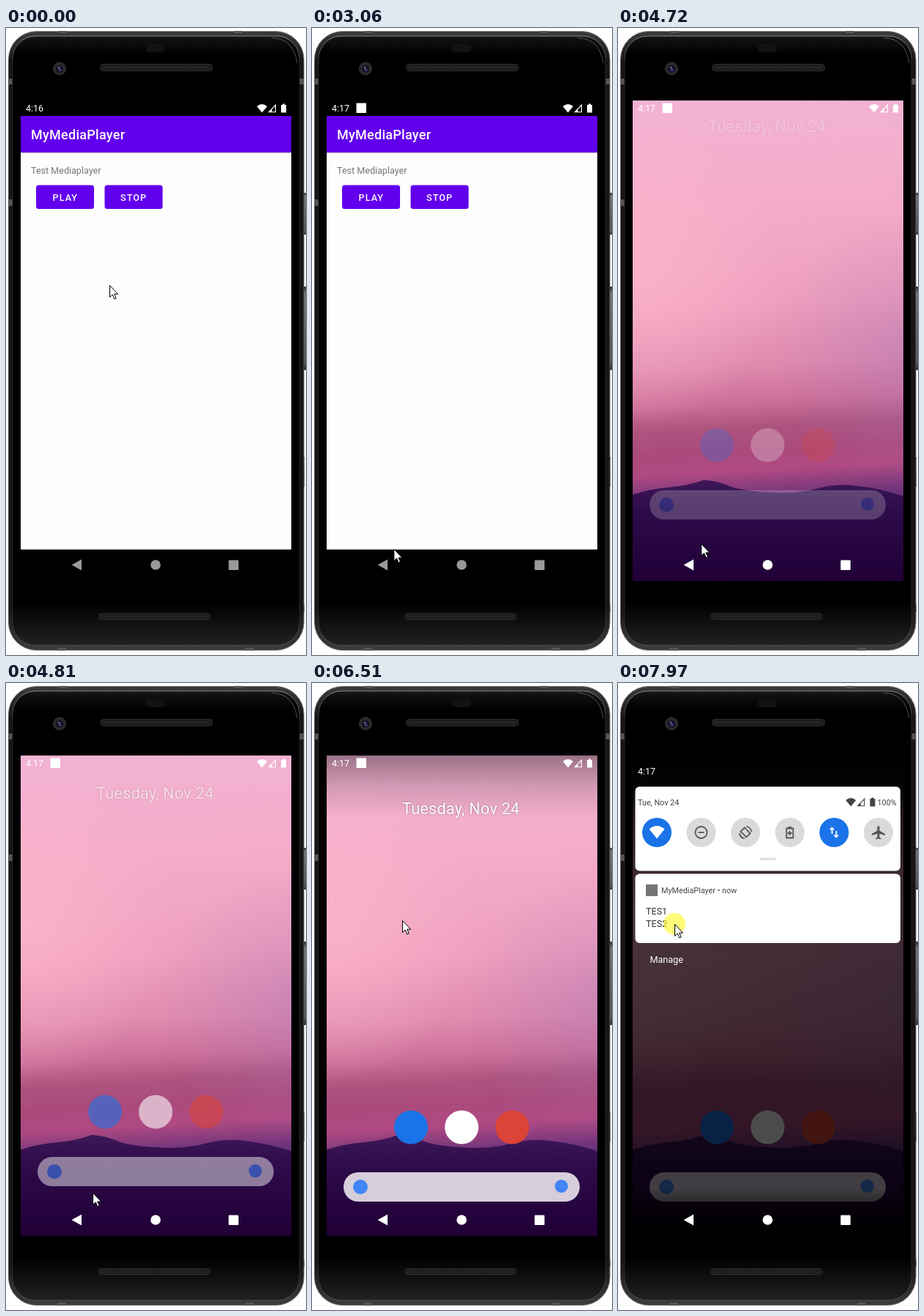
These frames come from a looping animation (409x856 px, 8000 ms). An HTML page:

```html
<!DOCTYPE html>
<html lang="en">
<head>
<meta charset="utf-8">
<title>Media player on a phone</title>
<style>
html, body { margin: 0; width: 100%; height: 100%; overflow: hidden; background: #fff; }
svg { display: block; width: 409px; height: 856px; font-family: Roboto, sans-serif; }
.medium { font-weight: 500; }
.button { font-size: 12.57px; font-weight: 500; letter-spacing: 1.12px; fill: #fff; }
.small { font-size: 10.8px; fill: #444; }
.body { font-size: 12.57px; fill: #333; }
.line { fill: none; stroke: #555; stroke-width: 1.8; }
</style>
</head>
<body>
<svg viewBox="0 0 409 856">
<defs>
  <linearGradient id="case" x2="0" y2="1">
    <stop stop-color="#3c3c3c"/><stop offset=".05" stop-color="#161616"/>
    <stop offset=".93" stop-color="#161616"/><stop offset="1" stop-color="#3c3c3c"/>
  </linearGradient>
  <linearGradient id="edge" x2="0" y2="1">
    <stop stop-color="#888"/><stop offset=".06" stop-color="#555"/>
    <stop offset=".94" stop-color="#555"/><stop offset="1" stop-color="#777"/>
  </linearGradient>
  <linearGradient id="glass" x2="0" y2="1">
    <stop stop-color="#151515"/><stop offset=".03"/><stop offset=".93"/><stop offset="1" stop-color="#222"/>
  </linearGradient>
  <linearGradient id="rim" x2="0" y2="1">
    <stop stop-color="#888"/><stop offset=".05" stop-color="#222"/>
    <stop offset=".95" stop-color="#222"/><stop offset="1" stop-color="#555"/>
  </linearGradient>
  <linearGradient id="key" x2="0" y2="1">
    <stop stop-color="#222"/><stop offset=".08" stop-color="#777"/>
    <stop offset=".92" stop-color="#555"/><stop offset="1" stop-color="#222"/>
  </linearGradient>
  <linearGradient id="sky" gradientUnits="userSpaceOnUse" x1="196" y1="99" x2="226" y2="645">
    <stop stop-color="#f2b2d2"/><stop offset=".25" stop-color="#f3acc9"/>
    <stop offset=".5" stop-color="#ee9fbe"/><stop offset=".66" stop-color="#df8aae"/>
    <stop offset=".75" stop-color="#cd7099"/><stop offset=".81" stop-color="#ad547f"/>
    <stop offset=".87" stop-color="#aa4a7c"/><stop offset=".92" stop-color="#b04a82"/>
    <stop offset="1" stop-color="#65307a"/>
  </linearGradient>
  <radialGradient id="dusk" gradientUnits="userSpaceOnUse" cx="400" cy="440" r="190">
    <stop stop-color="#a877b8" stop-opacity=".4"/><stop offset="1" stop-color="#a877b8" stop-opacity="0"/>
  </radialGradient>
  <radialGradient id="glow" gradientUnits="userSpaceOnUse" cx="20" cy="330" r="210">
    <stop stop-color="#ffb6cc" stop-opacity=".75"/><stop offset="1" stop-color="#ffb6cc" stop-opacity="0"/>
  </radialGradient>
  <linearGradient id="hill" x2="0" y2="1">
    <stop stop-color="#3e1858"/><stop offset=".3" stop-color="#2e0b4a"/><stop offset="1" stop-color="#200036"/>
  </linearGradient>
  <linearGradient id="topShade" x2="0" y2="1">
    <stop stop-opacity=".36"/><stop offset=".5" stop-opacity=".13"/><stop offset="1" stop-opacity="0"/>
  </linearGradient>
  <linearGradient id="dimmer" x2="0" y2="1">
    <stop/><stop offset=".06" stop-opacity=".97"/><stop offset=".12" stop-opacity=".85"/>
    <stop offset=".3" stop-opacity=".72"/><stop offset=".9" stop-opacity=".7"/><stop offset=".99"/>
  </linearGradient>
  <pattern id="mesh" width="3" height="3" patternUnits="userSpaceOnUse">
    <path d="M0 0h1v1h-1zM1.5 1.5h1v1h-1z" fill="#4a4a4a"/>
  </pattern>
  <clipPath id="screen"><rect x="20" y="99" width="369" height="656"/></clipPath>
  <clipPath id="playClip"><rect x="41" y="214.500" width="79" height="32.500" rx="3.500"/></clipPath>
  <clipPath id="panelClip"><rect id="panelArea" x="20" y="99" width="369" height="656"/></clipPath>
  <g id="signals">
    <path d="M0 3Q7-3 14 3L7 11.500Z"/>
    <path fill-rule="evenodd" d="M15 11.300L26-.2V11.300ZM20.500 10.200H24.800V2.700L20.500 7.200Z"/>
    <path d="M33 1h2v-1.500h3V1h2v10.500h-7z"/>
  </g>
</defs>

<g fill="url(#key)">
  <rect x="403" y="225" width="6" height="57" rx="1"/>
  <rect x="403" y="353" width="6" height="114" rx="1"/>
  <rect x="403" y="586" width="4" height="40"/><rect x="403" y="787" width="4" height="10"/>
</g>
<rect x="3.500" y="4.500" width="402.500" height="845" rx="38" fill="url(#case)" stroke="url(#edge)"/>
<path d="M3 69h6v8H3zM400 69h6v8h-6zM3 234h6v9H3zM72 4h11v3H72zM311 4h11v3h-11zM70 846h12v4H70zM326 846h12v4h-12z" fill="#555"/>
<rect x="9" y="11" width="391" height="832" rx="31" fill="url(#glass)" stroke="url(#rim)"/>
<path d="M362 13.500Q392 14 397 48" fill="none" stroke="#bbb" opacity=".4"/>
<rect x="191" y="22" width="26" height="11" rx="5" fill="#131313"/>
<g stroke="#333" fill="#171717">
  <rect x="128.500" y="49.500" width="153" height="9" rx="4"/>
  <rect x="126.500" y="799.500" width="152" height="8" rx="4"/>
  <circle cx="73" cy="55.500" r="8.500" fill="#29292d"/>
</g>
<path d="M131 51.500h148v5H131zM129 801.500h147v4H129z" fill="url(#mesh)"/>
<circle cx="73" cy="56" r="5" fill="#141226"/><circle cx="73.500" cy="57" r="2" fill="#4a4080"/><circle cx="72" cy="54" r="1" fill="#aaa"/>

<g clip-path="url(#screen)">
  <rect x="20" y="99" width="369" height="656" fill="url(#sky)"/>
  <rect x="20" y="99" width="369" height="656" fill="url(#dusk)"/>
  <rect x="20" y="99" width="369" height="656" fill="url(#glow)"/>
  <path d="M20 637Q45 629 70 627T117 617Q135 618 151 625T208 634Q240 637 270 629T325 625Q355 628 389 639V755H20Z" fill="url(#hill)"/>
  <rect id="scrim" x="20" y="99" width="369" height="85" fill="url(#topShade)"/>
  <g id="home">
    <text x="123" y="179" font-size="21.600" letter-spacing=".25" fill="#fff" style="text-shadow:0 0 2px #0006">Tuesday, Nov 24</text>
    <circle cx="135" cy="606.500" r="23" fill="#1a73e8"/>
    <circle cx="204" cy="606.500" r="23" fill="#fff"/>
    <circle cx="273" cy="606.500" r="23" fill="#db4437"/>
    <rect x="43" y="668" width="322" height="40" rx="20" fill="#d6cfdb"/>
    <circle cx="66" cy="688" r="10" fill="#4285f4"/>
    <circle cx="340" cy="687" r="9" fill="#4285f4"/>
  </g>
  <rect id="dim" x="20" y="99" width="369" height="656" fill="url(#dimmer)"/>

  <g id="app">
    <rect x="20" y="99" width="369" height="656"/>
    <rect x="20" y="120" width="369" height="592" fill="#fefefe"/>
    <rect x="20" y="170" width="369" height="1" opacity=".12"/>
    <rect x="20" y="120" width="369" height="50" fill="#6200ee"/>
    <text class="medium" x="34" y="152" font-size="17.960" letter-spacing=".3" fill="#fff">MyMediaPlayer</text>
    <text x="34" y="198.500" font-size="12.570" fill="#757575">Test Mediaplayer</text>
    <rect id="lift" x="40" y="219" width="81" height="33" rx="5" opacity="0" style="filter:blur(2px)"/>
    <g fill="#6200ee">
      <rect x="41" y="214.500" width="79" height="32.500" rx="3.500"/>
      <rect x="134.500" y="214.500" width="79" height="32.500" rx="3.500"/>
    </g>
    <g clip-path="url(#playClip)"><circle id="ripple" cx="81" cy="230" fill="#fff"/></g>
    <text class="button" x="63.500" y="235.500">PLAY</text>
    <text class="button" x="156" y="235.500">STOP</text>
  </g>

  <g id="panel" clip-path="url(#panelClip)">
    <rect x="23.500" y="141.500" width="361.500" height="115" rx="6" fill="#fff"/>
    <text class="small" x="27" y="166.500">Tue, Nov 24</text>
    <use href="#signals" x="310.500" y="157" fill="#444"/>
    <text class="small" x="353.500" y="166.500">100%</text>
    <g fill="#dadada">
      <circle cx="53" cy="204" r="20" fill="#1a73e8"/><circle cx="113.400" cy="204" r="20"/>
      <circle cx="173.800" cy="204" r="20"/><circle cx="234.200" cy="204" r="20"/>
      <circle cx="294.600" cy="204" r="20" fill="#1a73e8"/><circle cx="355" cy="204" r="20"/>
    </g>
    <path d="M42.500 199.500Q53 190.500 63.500 199.500L53 212.500Z" fill="#fff"/>
    <g class="line">
      <circle cx="113.400" cy="204" r="8"/><path d="M109.400 204h8"/>
      <rect x="170" y="198.500" width="7.500" height="11" transform="rotate(-45 173.800 204)"/>
      <path d="M165.500 205q1 6 7 7.500M182 203q-1-6-7-7.500"/>
      <path d="M229.700 198.500h9v13h-9zM232 197h4.500M234.200 202v6M231.200 205h6"/>
      <path d="M291.800 206v-8M289 200.500l2.800-3 2.800 3M297.500 202v8M294.700 207.500l2.800 3 2.800-3" stroke="#fff"/>
    </g>
    <path d="M355 195q1.500 0 1.500 2v4.500l7.500 4.500v2l-7.500-2.300v4.800l2 1.500v1.500l-3.500-1-3.500 1v-1.500l2-1.500v-4.800l-7.500 2.300v-2l7.500-4.500v-4.500q0-2 1.500-2z" fill="#555"/>
    <rect x="193" y="238.500" width="22" height="3.500" rx="1.500" fill="#e0e0e0"/>
    <rect id="note" x="23.500" y="260.500" width="361.500" height="94.500" rx="6" fill="#fff"/>
    <rect x="38" y="275" width="16" height="16" fill="#757575"/>
    <text class="small" x="59" y="287">MyMediaPlayer • now</text>
    <text class="body" x="38" y="315.500">TES1</text>
    <text class="body" x="38" y="333">TES2</text>
    <text id="manage" x="43.500" y="382" font-size="12.570" fill="#fff">Manage</text>
  </g>

  <text id="clock" x="27" y="114" font-size="12.500" fill="#fff"></text>
  <g id="status" fill="#fff">
    <rect id="badge" x="60.500" y="102.500" width="13.500" height="13.500"/>
    <use href="#signals" x="342" y="104"/>
  </g>
  <rect id="backRipple" x="50" y="712" width="94" height="43" rx="21.500" fill="#fff"/>
  <g id="nav">
    <path d="M103 725.500V740.500L89.500 733Z"/><circle cx="204" cy="733" r="6.800"/>
    <rect x="303.500" y="726.500" width="13.500" height="13.500" rx="1"/>
  </g>
</g>
<g id="cursor">
  <circle id="press" r="15" fill="#fff830" opacity=".65"/>
  <path d="M.5.5V16.500L4.200 13 6.800 19 9.200 18 6.600 12.200H11.500Z" fill="#fff" stroke="#000"/>
</g>
</svg>
<script>
const LOOP = 8000, STEP = 76.65;
const $ = id => document.getElementById(id);
const set = (id, attrs) => { for (const k in attrs) $(id).setAttribute(k, attrs[k]); };
const ramp = (t, a, b) => Math.min(1, Math.max(0, (t - a) / (b - a)));
const within = (t, a, b) => t >= a && t < b;

// Pointer path: time, x, y
const path = [
  [0, 141, 351], [145, 141, 351], [990, 81, 230], [1610, 81, 230], [1833, 128, 289.5],
  [2370, 207, 584], [2520, 207, 584], [3140, 97, 730], [4150, 97, 731], [4822, 118, 696],
  [5052, 178, 514], [5205, 194, 322], [5350, 194, 322], [6202, 123, 114], [6279, 123, 114],
  [6355, 127, 160], [6432, 129, 270], [6508, 123, 324], [7510, 123, 324], [7811, 77, 329], [LOOP, 77, 329]
];
function pointer(t) {
  const i = path.findIndex(p => p[0] > t);
  const a = path[i - 1], b = path[i], k = ramp(t, a[0], b[0]);
  return [a[1] + (b[1] - a[1]) * k, a[2] + (b[2] - a[2]) * k];
}

function draw(t) {
  // The screen refreshes in coarse steps
  const q = t < 70 ? 0 : Math.min(LOOP - 1, 70 + Math.floor((t - 55) / STEP) * STEP);
  const [x, y] = pointer(q);
  set("cursor", { transform: `translate(${x} ${y})` });
  const pressed = within(t, 1000, 1150) || within(t, 3290, 3520) || within(t, 6280, 6510) || t >= 7970;
  set("press", { visibility: pressed ? "visible" : "hidden" });

  const shade = t < 6740 ? 0 : t < 6810 ? .5 : 1;
  $("clock").textContent = t < 70 ? "4:16" : "4:17";
  set("clock", { y: shade ? 125 : 114 });
  set("status", { opacity: shade ? 0 : 1 });
  set("badge", { opacity: t < 1690 ? 0 : 1 });

  const tap = within(q, 1060, 1370);
  set("ripple", { r: 10 + 45 * ramp(q, 1060, 1250), opacity: tap ? .3 * (1 - ramp(q, 1200, 1370)) : 0 });
  set("lift", { opacity: tap ? .3 : 0 });

  const grey = Math.round(153 + 102 * ramp(q, 3280, 3520));
  set("nav", { fill: `rgb(${grey},${grey},${grey})` });
  set("backRipple", { opacity: t < 4080 ? .2 * ramp(q, 3360, 3850) : 0 });

  const close = ramp(q, 4150, 4600);
  set("app", { opacity: 1 - close, transform: `translate(0 ${30 * close})` });

  const show = ramp(q, 4545, 5022);
  set("home", { opacity: show, transform: `translate(0 ${-50 * (1 - show)})` });
  set("scrim", { opacity: ramp(q, 5345, 5900) });

  set("dim", { opacity: shade });
  set("panel", { opacity: shade });
  set("panelArea", { height: shade < 1 ? 130 : 656 });
  set("note", { height: t < 6890 ? 77.5 : 94.5 });
  set("manage", { opacity: t < 7120 ? 0 : t < 7200 ? .5 : 1 });
}

function frame() {
  draw(performance.now() % LOOP);
  requestAnimationFrame(frame);
}
frame();
</script>
</body>
</html>
```
